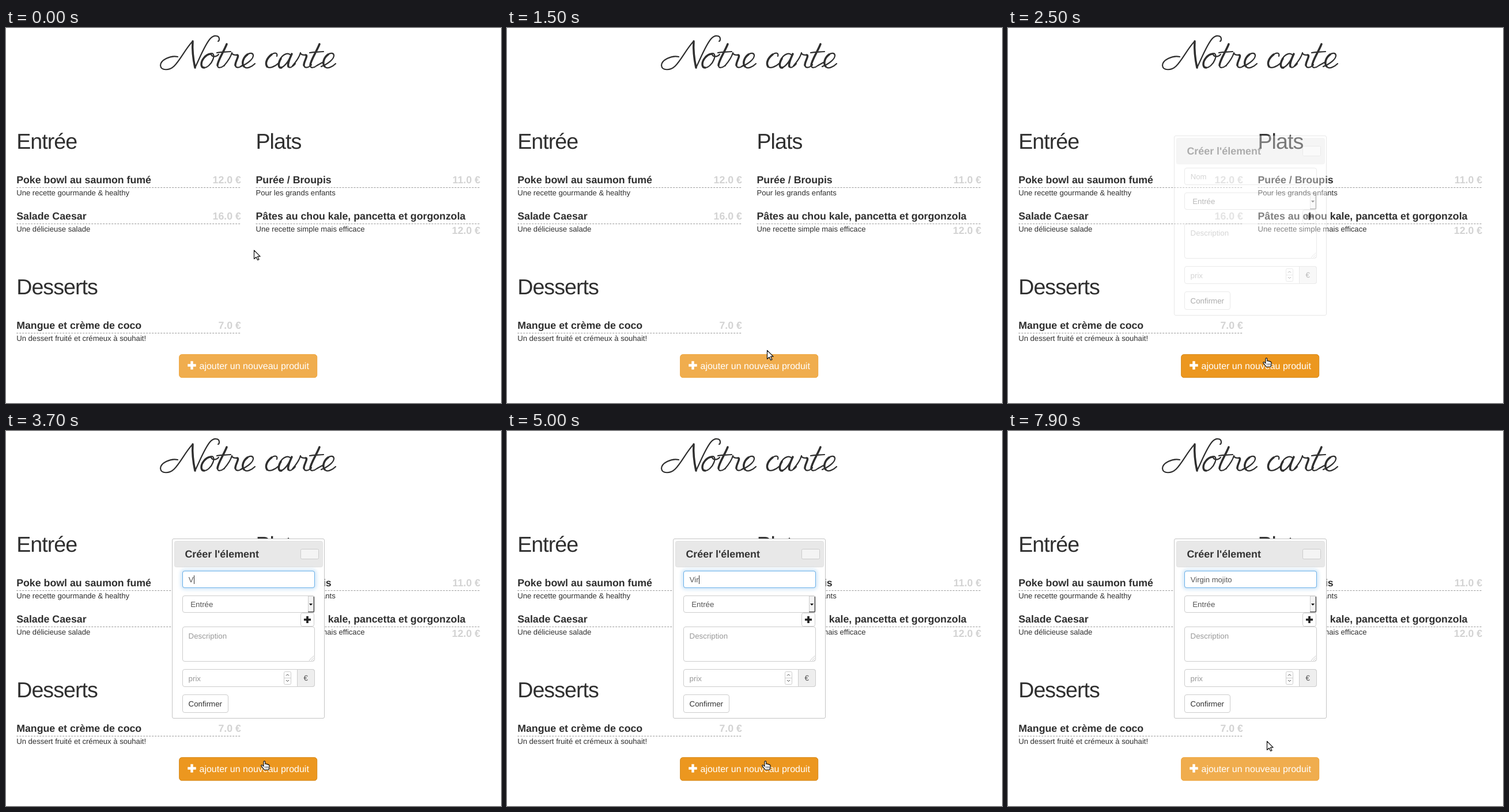
Animation of 859x652 px, one loop 8000 ms. Source, as an HTML page:

```html
<!DOCTYPE html>
<html lang="fr">
<head>
<meta charset="utf-8">
<title>Notre carte</title>
<style>
html, body { margin: 0; width: 100%; height: 100%; overflow: hidden; background: #fff; }
svg { display: block; width: 859px; height: 652px; font-family: "Liberation Sans", Arial, sans-serif; text-rendering: geometricPrecision; }
text { fill: #2f2f2f; white-space: pre; }
.section { font-size: 37.6px; letter-spacing: -.025em; }
.dish { font-size: 17.75px; font-weight: bold; }
.price { font-size: 17.75px; font-weight: bold; fill: #d3d3d3; text-anchor: end; }
.note { font-size: 13.1px; }
.rule { stroke: #999; stroke-dasharray: 3 2; }
.script { fill: none; stroke: #2f2f2f; stroke-linecap: round; stroke-linejoin: round; }
.thin { stroke-width: 2.2; }
.thick { stroke-width: 3.5; }
#add rect { fill: #f0ad4e; stroke: #eea236; }
#add.hover rect { fill: #ec971f; stroke: #d58512; }
#add text { font-size: 16px; fill: #fff; }
.field { fill: #fff; stroke: #ccc; }
.form { font-size: 13.3px; }
.form text { fill: #333; }
.form .hint { fill: #999; }
.form .value { fill: #555; }
.form .head { font-size: 17.9px; font-weight: bold; }
#name, #hint { font-size: 13.1px; }
.pointer { fill: #fff; stroke: #111; stroke-width: 1.2; stroke-linejoin: round; }
</style>
</head>
<body>
<svg viewBox="0 0 859 652">
  <defs>
    <path id="plus" d="M-2.2-7.2h4.4v5h5v4.4h-5v5h-4.4v-5h-5v-4.4h5z"/>
    <g id="t">
      <path class="thick" d="M383 28C378 41 367 57 367 65"/>
      <path class="thin" d="M367 65C367 71 374 69 379 65M366 43C374 41 382 42 390 41"/>
    </g>
    <g id="r">
      <path class="thin" d="M378 66C384 59 390 51 392 43C392 47 397 47 401 47M398 65C399 70 405 70 411 64"/>
      <path class="thick" d="M401 47C406 48 397 59 398 65"/>
    </g>
    <g id="e">
      <path class="thin" d="M407 67C420 62 430 53 429 47C428 43 423 43 419 46M413 67C417 72 426 68 432 62"/>
      <path class="thick" d="M419 46C412 51 408 61 413 67"/>
    </g>
  </defs>

  <g class="script" role="img" aria-label="Notre carte">
    <path class="thin" d="M298 50C285 47 268 56 268 65C269 75 284 74 292 66C303 55 312 35 324 23M328 69C336 53 344 31 354 19C361 11 370 13 370 19C370 22 369 23 368 23"/>
    <path class="thick" d="M324 23C323 38 325 55 328 69"/>
    <path class="thin" d="M355 45C360 42 362 48 359 55C356 63 349 69 344 69M356 45C357 51 364 51 369 46"/>
    <path class="thick" d="M355 45C346 46 339 56 339 63C339 67 341 69 344 69"/>
    <use href="#t"/><use href="#r"/><use href="#e"/>
    <path class="thin" d="M470 49C472 43 466 42 461 46M453 67C456 71 466 68 473 61M494 47C489 42 480 46 476 54M477 69C485 67 493 53 496 45M490 67C492 71 498 67 502 62"/>
    <path class="thick" d="M461 46C453 52 449 61 453 67M477 53C471 63 473 70 478 69M496 45C492 54 488 62 490 67"/>
    <use href="#r" x="119"/><use href="#t" x="161"/><use href="#e" x="140"/>
    <path class="thin" d="M540 65L549 60"/>
  </g>

  <g id="menu"></g>

  <g id="add">
    <rect x="300.7" y="567.7" width="239" height="40" rx="4.5"/>
    <use href="#plus" x="322.5" y="586.5" fill="#fff"/>
    <text x="335.5" y="593">ajouter un nouveau produit</text>
  </g>

  <g id="dialog" class="form">
    <rect x="288.5" y="187.5" width="264" height="312" rx="2.5" fill="#fff" stroke="#c4c4c4"/>
    <rect x="292.5" y="191.5" width="257" height="45" rx="3" fill="#e8e8e8" stroke="#e2e2e2"/>
    <text class="head" x="310.4" y="220">Créer l'élement</text>
    <rect x="511.5" y="205.5" width="31" height="17" rx="2" fill="#f4f4f4" stroke="#ccc"/>

    <rect class="field" x="306.5" y="243.5" width="229" height="29" rx="3.5"/>
    <g id="glow">
      <rect x="306" y="243" width="230" height="30" rx="4" fill="none" stroke="#66afe9" stroke-width="3" opacity=".6" style="filter:blur(3px)"/>
      <rect x="306.5" y="243.5" width="229" height="29" rx="3.5" fill="#fff" stroke="#66afe9"/>
    </g>
    <text id="hint" class="hint" x="316.8" y="263">Nom</text>
    <text id="name" class="value" x="316.8" y="263"></text>
    <rect id="caret" y="251" width="1" height="15" fill="#333"/>

    <rect class="field" x="306.5" y="286.5" width="229" height="29" rx="3.5"/>
    <text class="value" x="320.2" y="306">Entrée</text>
    <path d="M524 287h10v28h-10z" fill="#f4f4f4"/>
    <path d="M524.5 315v-28h9" fill="none" stroke="#ccc"/>
    <path d="M534.2 288v26.5h-10" fill="none" stroke="#555" stroke-width="1.4"/>
    <path d="M526 300h6l-3 3.5z" fill="#111"/>

    <rect class="field" x="511.5" y="316.5" width="23" height="23" rx="3"/>
    <use href="#plus" transform="translate(523 328) scale(.84)" fill="#222"/>

    <rect class="field" x="306.5" y="340.5" width="229" height="60" rx="3.5"/>
    <text class="hint" x="316.6" y="361">Description</text>
    <path d="M526 399l8-8M529.5 399l4.5-4.5M532.5 399l1.5-1.5" stroke="#aaa" stroke-dasharray="1.5 1"/>

    <rect class="field" x="306.5" y="414.5" width="229" height="30" rx="3.5"/>
    <path d="M505.5 414.5h26.5a3.5 3.5 0 0 1 3.5 3.5v23a3.5 3.5 0 0 1-3.5 3.5h-26.5z" fill="#eee" stroke="#ccc"/>
    <text class="hint" x="316.6" y="435">prix</text>
    <text class="value" x="516.5" y="434">€</text>
    <rect class="field" x="482.5" y="418.5" width="12" height="22" rx="2"/>
    <path d="M482.5 429.5h12" stroke="#ccc"/>
    <path d="M486 425.5l2.5-2.5 2.5 2.5M486 433l2.5 2.5 2.5-2.5" fill="none" stroke="#444"/>

    <rect class="field" x="306.5" y="458.5" width="79" height="31" rx="3.5"/>
    <text x="316.6" y="479">Confirmer</text>
  </g>

  <g id="cursor" class="pointer">
    <path id="arrow" d="M.5.5v15l3.6-3.3 2.6 5.3 2.3-1.1-2.5-5.2h4.6z"/>
    <g id="hand" transform="translate(-.5 -.5)">
      <path d="M-1.5 9.5V2C-1.5-.2 1.3-.2 1.3 2v3.6C2.500 4.700 3.700 5 4 6.200 5.200 5.500 6.400 5.900 6.600 7 8 6.600 8.500 7.500 8.500 8.600V11c0 1.600-.8 2.200-1 4.500H-.8C-1 13.500-4 11.500-5.500 9.200-6.300 7.300-4.300 6.700-3.200 7.900z"/>
      <path d="M1.3 9.5v3.5M4 9.5v3.5M6.4 9.5v3.5" stroke-width=".8"/>
    </g>
  </g>
</svg>
<script>
const LOOP = 8000, STEP = 100;
const $ = id => document.getElementById(id);

const menu = [
  { x: 18.2, y: 210, title: 'Entrée', items: [
    ['Poke bowl au saumon fumé', 'Une recette gourmande & healthy', '12.0 €'],
    ['Salade Caesar', 'Une délicieuse salade', '16.0 €']] },
  { x: 433.5, y: 210, title: 'Plats', items: [
    ['Purée / Broupis', 'Pour les grands enfants', '11.0 €'],
    ['Pâtes au chou kale, pancetta et gorgonzola', 'Une recette simple mais efficace', '12.0 €', 25]] },
  { x: 18.2, y: 463, title: 'Desserts', items: [
    ['Mangue et crème de coco', 'Un dessert fruité et crémeux à souhait!', '7.0 €']] }
];

function add(tag, attrs, text = '') {
  const node = document.createElementNS('http://www.w3.org/2000/svg', tag);
  for (const key in attrs) node.setAttribute(key, attrs[key]);
  node.textContent = text;
  $('menu').append(node);
}
const label = (cls, x, y, text) => add('text', { class: cls, x, y }, text);

for (const { x, y, title, items } of menu) {
  label('section', x, y, title);
  items.forEach(([dish, note, price, drop = 0], i) => {
    const base = y + 60 + i * 63, right = x + 389.7;
    label('dish', x, base, dish);
    label('price', right, base + drop, price);
    add('line', { class: 'rule', x1: x, x2: right, y1: base + 7.5, y2: base + 7.5 });
    label('note', x, base + 21, note);
  });
}

// Pointer stops: time, x, y
const path = [
  [200, 430, 386], [300, 431, 389], [400, 433, 401], [800, 450, 480],
  [1000, 455, 508], [1100, 455, 520], [1400, 452, 552], [1600, 450, 567],
  [1700, 449, 572], [1800, 449, 574], [7700, 449, 574], [7800, 449, 560], [7900, 449, 539]
];
const word = 'Virgin mojito';
const keys = [3700, 4800, 5000, 5200, 5300, 5500, 5600, 6000, 6200, 6400, 6600, 6800, 7000];

function pointerAt(t) {
  const i = path.findIndex(p => p[0] >= t);
  if (i < 1) return (i ? path[path.length - 1] : path[0]).slice(1);
  const [t0, x0, y0] = path[i - 1], [t1, x1, y1] = path[i];
  const k = (t - t0) / (t1 - t0);
  return [Math.round(x0 + (x1 - x0) * k), Math.round(y0 + (y1 - y0) * k)];
}

const show = (id, on) => { $(id).style.display = on ? '' : 'none'; };
const clamp = v => Math.max(0, Math.min(1, v));
let last = -1;

function draw(t) {
  const [x, y] = pointerAt(t), hover = y >= 567;
  $('cursor').setAttribute('transform', `translate(${x} ${y})`);
  show('arrow', !hover);
  show('hand', hover);
  $('add').classList.toggle('hover', hover);

  show('dialog', t >= 2500);
  if (t < 2500) return;
  $('dialog').style.opacity = clamp((t - 2440) / 150);
  $('glow').style.opacity = clamp((t - 2500) / 180);
  const count = keys.filter(k => k <= t).length;
  $('name').textContent = word.slice(0, count);
  show('hint', !count);
  show('caret', t >= 2600 && t < 7300);
  const width = count ? $('name').getComputedTextLength() : 0;
  $('caret').setAttribute('x', Math.round(316.8 + width));
}

const start = performance.now();
function frame() {
  const t = Math.floor((performance.now() - start) % LOOP / STEP) * STEP;
  if (t !== last) draw(last = t);
  requestAnimationFrame(frame);
}
frame();
</script>
</body>
</html>
```
